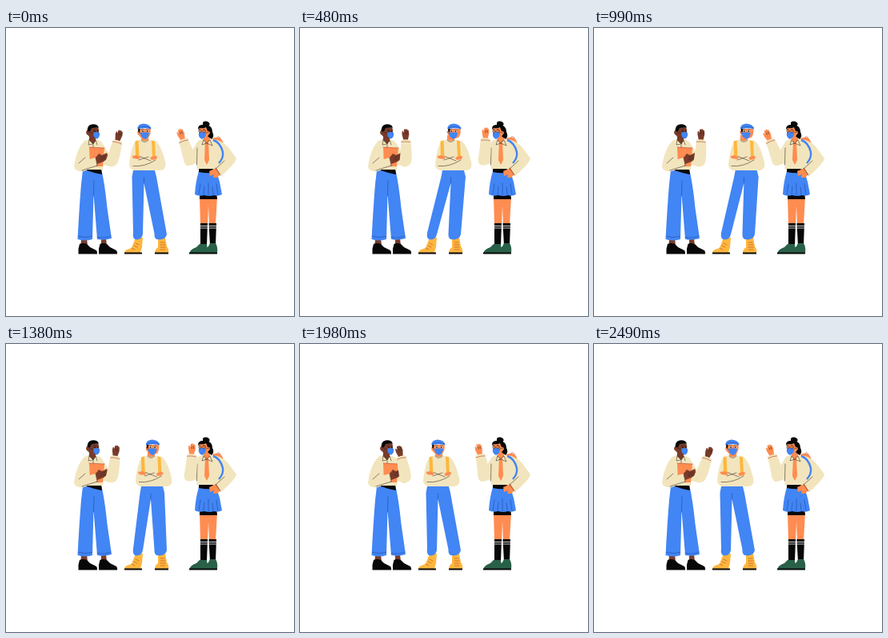
Animation, 360 px wide and 360 px high, one loop 2.52 s. Source, as an HTML page:

```html
<!DOCTYPE html>
<html lang="en">
<head>
<meta charset="utf-8">
<title>Three students</title>
<style>
  html, body { margin: 0; width: 100%; height: 100%; overflow: hidden; background: #fff; }
  svg { display: block; width: 100vw; height: 100vh; }
  .shirt { fill: #f2e5bd; }
  .blue { fill: #4285f4; }
  .orange { fill: #ff8c50; }
  .brown { fill: #783b2a; }
  .yellow { fill: #fdb73e; }
  .black { fill: #080808; }
  .white { fill: #fff; }
  .green { fill: #286048; }
  .line { fill: none; stroke: #33231c; stroke-width: .55; stroke-linecap: round; stroke-linejoin: round; }
  .red { stroke: #b23a25; }
  .navy { stroke: #1c4699; }
  .pale { stroke: #fff; stroke-width: .8; }
</style>
</head>
<body>
<svg viewBox="0 0 360 360">
  <defs>
    <g id="hand">
      <path d="M-2.500-27L-3.500-31Q-5-35-4.500-38Q-4-40-3-38.500L-2.200-37L-2.200-40.500Q-1-42.500 0-41Q1.300-42.800 2.300-40.500Q4-41 4-38.500Q5-35 3.500-31L2.800-27Z"/>
      <path class="line" d="M-.3-38V-35.500M1.900-38V-35.500"/>
    </g>
    <g id="sleeve">
      <path class="shirt" d="M-5.500-28Q0-29.500 6-28Q8.500-14 7.500-2Q6 5-1 5.500Q-7 6-7.500-1Q-6-15-5.500-28Z"/>
      <path class="line red" d="M-5.300-25.500Q0-26.800 6-25.500"/>
    </g>
  </defs>

  <g id="left">
    <path class="brown" d="M94 263H101L102 272H93.500ZM119 263H125L126 272H119Z"/>
    <path class="black" d="M92 270Q96 268 101 270L105 274L113 278Q114.500 280 114 282.500H90.500V276ZM117.500 270Q121 268 126 270L130 274L138 278Q139.500 280 139 282.500H116V276Z"/>
    <path class="blue" d="M96 178H119.500Q123.500 195 126.500 225L132 263Q123 266 114 264L109.500 208L108 264Q99 267 89.500 264Q91.500 225 94 195Z"/>
    <path class="line navy" d="M110 191L109.500 210M90.500 260.500Q99 263 107.500 260.500M114 261.500Q124 263.500 131 260"/>
    <path class="black" d="M101 176H119L120 183Q109 181 101 178Z"/>
    <path class="shirt" d="M98 141L104 139H113L119 142L126 153L133 166L130 173L122 171L121 177H101L97 179Q86 180 85 173Q88 151 98 141Z"/>
    <path class="brown" d="M104 133H112V141L109 145L104 140Z"/>
    <path class="line" d="M104 140L109 145L112 140L114 146M104 140L103 146L109 145M109 146V150"/>
    <path class="orange" d="M104 149L123 150L121 173H105Z"/>
    <path class="line red" d="M104 149L123 150"/>
    <path class="shirt" d="M90 168L112 162L114 172L97 179Q90 179 88 175Z"/>
    <path class="line" d="M99 162L91 169M112 162L114 172M95 178L114 172"/>
    <path class="brown" d="M112 162L116 157L120 159L126 156Q128 159 126 164L122 167L114 170Z"/>
    <path class="line" d="M118 162L124 160M118 164.500L124 163"/>
    <path class="brown" d="M103.500 124.500H115.500Q116.500 131 115.500 137Q110 140 105 137L102.500 134Q99 132 100.500 129Z"/>
    <path class="black" d="M102 128.500Q101 122 107 120.500Q114 119.500 116 124.500L107 125L105 129L103 129.500Z"/>
    <path class="blue" d="M109 131Q113 129 117 131Q118 136 114 138.500Q109 138 109 131Z"/>
    <path class="line" d="M104 130L109 132M109.500 127.500L112 127M114 127.500L116 127.500"/>
    <circle class="black" cx="111" cy="129.300" r=".8"/><circle class="black" cx="115" cy="129.300" r=".7"/>
    <g id="waveL"><use href="#hand" class="brown"/><use href="#sleeve"/></g>
  </g>

  <g id="middle">
    <path class="yellow" d="M162 262H171L170 274L168 281H148Q148 277 157 275ZM190 262H199L201 273Q204 277 203 281H186Q186 277 190 274Z"/>
    <path class="line red" d="M162 269L166 271M160 272L164 274M157 275L161 277M193 268H198M193 271H199M193 274H199M193 277H199"/>
    <path class="black" d="M148 280.500H170V282.500H148ZM186 280.500H203V282.500H186Z"/>
    <path class="blue" id="legs"/>
    <path class="line navy" id="seam"/>
    <g id="torso">
      <path class="orange" d="M169 134H178V142L173 146L169 141Z"/>
      <path class="shirt" d="M162 141L169 139.500Q173 143 178 139.500L187 141Q195 148 199.500 170Q200 177 193 178H160Q154 176 154 170Q156 150 162 141Z"/>
      <path class="line" d="M169 140Q173 145 178 140"/>
      <g id="chest">
        <path class="yellow" d="M161.500 141.500L165.500 140.500L166.500 163H162ZM182 140.500L186 141.500L187 163H183Z"/>
        <path class="shirt" d="M157 164L183 162L194 165V175H160L156 173Z"/>
        <path class="line" d="M167 160.500L181 166M159 172.500Q173 174 187 165M166 165L178 161"/>
        <path class="orange" d="M157.500 160L163 159L168 162L166 164L159 163ZM180 162L186 159.500L189.500 161L187.500 164L182 165Z"/>
      </g>
    </g>
    <g id="head">
      <path class="orange" d="M165.500 126H180.500Q181.500 132 178.500 136.500Q173 140 168 136.500L166 134Q163.500 133 164.500 129Z"/>
      <path class="black" d="M165 126H167.500L167 131L165.500 129.500Z"/>
      <path class="blue" d="M164.500 126.500Q164 120 172 119.500Q180.500 120 181.500 126.500Q173 124 164.500 126.500Z"/>
      <path class="line navy" d="M165 125Q173 122 181 125"/>
      <g id="face">
        <path class="blue" d="M168 131Q173 129.500 179 131Q179 136 174 139Q168 137 168 131Z"/>
        <path class="line" d="M165.500 129.500L168 132M169 126.800L172 126.500M175.500 126.500L178 127"/>
        <circle class="white" cx="171" cy="128.800" r="1.300"/><circle class="white" cx="176.500" cy="128.800" r="1.300"/>
        <circle class="black" cx="171" cy="128.900" r=".9"/><circle class="black" cx="176.500" cy="128.900" r=".9"/>
      </g>
    </g>
  </g>

  <g id="right">
    <path class="orange" d="M258 138Q268 134 271 142L274 157Q273 166 264 166Z"/>
    <path class="line red" d="M264 137Q265 133 268 138M266 143Q271 145 272 157"/>
    <path class="orange" d="M242 211H264L262 246H254L253 222L252 246H243Z"/>
    <path class="black" d="M243 244H252L251 272H243ZM253.500 244H263L262 272H255Z"/>
    <path class="line pale" d="M243 247.500H252M243 250H252M254 247.500H263M254 250H263"/>
    <path class="green" d="M242 270H251L252 281H229.500Q230 277 238 274ZM255 269H262Q265 274 264 281H246Q247 276 253 273Z"/>
    <path class="black" d="M229 280.500H264V282.500H229ZM242 205H263L264 214H242Z"/>
    <path class="blue" d="M241 179H263Q268 193 270 208Q265 211 260 209Q254 211 248 209Q241 211 236 208Q237 192 241 179Z"/>
    <path class="line navy" d="M243 195L241 208M248 198L247 208M253 194V209M258 199L259 208M263 195L265 208"/>
    <path class="black" d="M241 175H260V181Q250 182 241 180Z"/>
    <path class="shirt" d="M240 141L246 139H255L264 140Q275 144 280 152L288 163Q287 169 269 185L262 178L258 176H238.500V169L231 171.500L224 167L234 151Z"/>
    <path class="orange" d="M247 134H255V140L251 145L247 140ZM254 179L263 175L268 183L264 187L259 187L260 183L255 185Z"/>
    <path class="orange" d="M249 142H253L254 165L251 171L248 165Z"/>
    <path class="line" d="M247 140L250.500 144L255 140L258 147L251 144L245 146L247 140M239 150L238.500 171M262 175L268 184M262 176L273 166"/>
    <path d="M259 140Q268 143 271 155Q272 163 266 169" fill="none" stroke="#4285f4" stroke-width="2.400"/>
    <path class="black" d="M240 126Q240 121 246 121L246 118Q249 115.500 253 117.500Q256 120 253.500 122Q258 124 258 130Q261 135 257 139L253 136Z"/>
    <path class="orange" d="M241.500 125Q247 126 250 124L252 129Q255 128 255 131.500L253 134Q250 140 243 137Q240 131 241.500 125Z"/>
    <path class="blue" d="M241 131Q245 129 250 131Q250 137 245 139Q240 137 241 131Z"/>
    <path class="line" d="M250 131L254 130M241 127L243 126.500M246 126.500L249 127"/>
    <circle class="line" cx="242.500" cy="129" r="1.600"/><circle class="line" cx="247.500" cy="129" r="1.700"/>
    <g id="waveR"><use href="#hand" class="orange"/><use href="#sleeve"/></g>
  </g>
</svg>
<script>
const LOOP = 2520, WAVE = 840, STEP = 30;
const $ = id => document.getElementById(id);
const set = (id, name, value) => $(id).setAttribute(name, value);
const shift = (id, x) => set(id, 'transform', `translate(${x} 0)`);

const handX = [[-30, 144], [0, 141.3], [150, 134], [300, 124], [480, 132], [540, 137.5], [700, 145], [810, 144], [840, 141.3]];
const lean = [[0, 0], [120, .12], [240, .5], [360, .88], [480, 1], [700, 1], [990, .93], [1380, .53], [1680, 0], [LOOP, 0]];

// Monotone cubic interpolation through the keys.
function curve(keys, t) {
  const slope = i => (keys[i + 1][1] - keys[i][1]) / (keys[i + 1][0] - keys[i][0]);
  const tangent = i => {
    if (i < 1 || i > keys.length - 2) return 0;
    const a = slope(i - 1), b = slope(i);
    return a * b > 0 ? 2 * a * b / (a + b) : 0;
  };
  let i = 0;
  while (i < keys.length - 2 && t >= keys[i + 1][0]) i++;
  const [t0, v0] = keys[i], [t1, v1] = keys[i + 1];
  const d = t1 - t0, u = (t - t0) / d, w = 1 - u;
  return v0 * w * w * (1 + 2 * u) + v1 * u * u * (3 - 2 * u)
    + d * (tangent(i) * u * w * w - tangent(i + 1) * u * u * w);
}

function wave(id, x, y, tipX) {
  const angle = Math.asin((tipX - x) / 36) * 180 / Math.PI;
  set(id, 'transform', `translate(${x} ${y}) rotate(${angle})`);
}

function draw(t) {
  const phase = t % WAVE;
  wave('waveL', 132, 168, curve(handX, phase));
  wave('waveR', 230, 166, 224.3 - 8.3 * Math.cos(2 * Math.PI * (phase - 105) / WAVE));

  const k = curve(lean, t), hip = 19 * k, crotch = 172.5 + 16 * k;
  shift('torso', 15 * k);
  shift('chest', -k);
  shift('head', 20 * k);
  shift('face', -2 * k);
  set('legs', 'd', `M${159 + hip} 178H${186 + hip}L${188 + hip} 186L201 258
    Q199 266 188 264Q185 262 185.5 257L${crotch} 194L171 258
    Q169 266 161 264Q158 262 159 256L${157.5 + hip} 186Z`);
  set('seam', 'd', `M${crotch} 187V194`);
}

function tick() {
  draw(Math.floor(performance.now() % LOOP / STEP) * STEP);
  requestAnimationFrame(tick);
}
tick();
</script>
</body>
</html>
```
